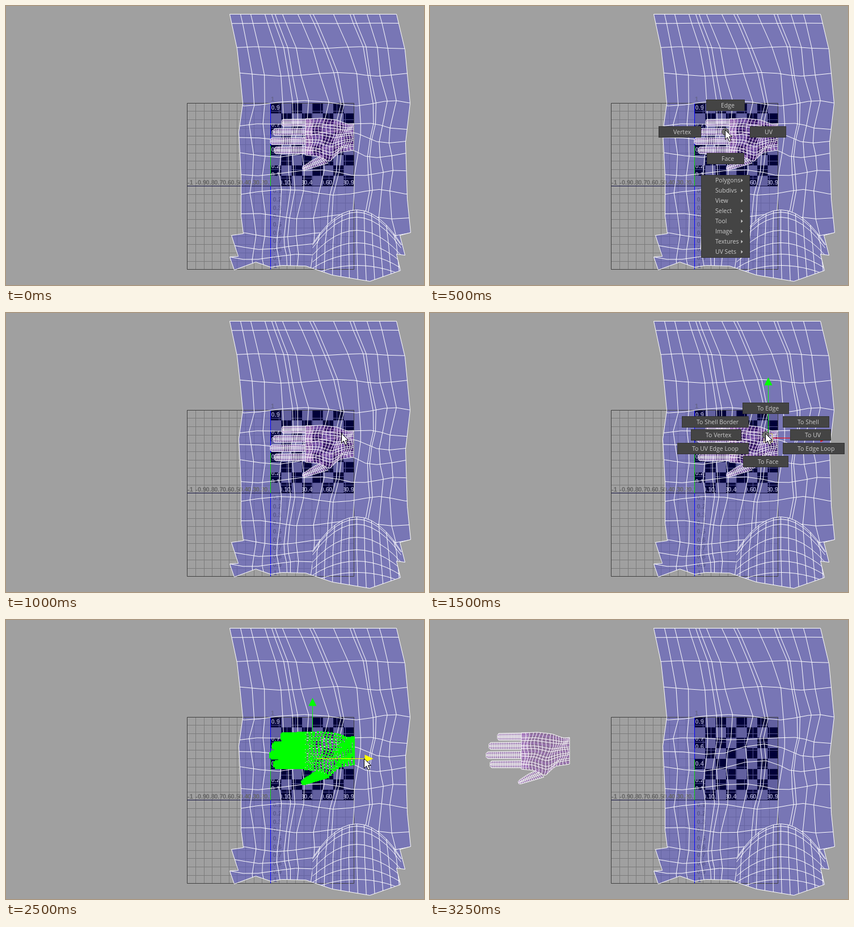
An HTML page with a canvas that plays this animation: 737x492 px, repeating every 3500 ms.

```html
<!DOCTYPE html>
<html>
<head>
<meta charset="utf-8">
<style>
html, body { margin: 0; width: 100%; height: 100%; overflow: hidden; background: #a0a0a0; }
canvas { display: block; }
</style>
</head>
<body>
<canvas id="stage" width="737" height="492"></canvas>
<script>
const c = document.getElementById('stage').getContext('2d');
const STEP = 250, LOOP = 3500;
const CX = 466.5, CY = 317.5, CELL = 14.68;

// Sheet: side edges from top to bottom, then the ragged hem from right to left
const left = [[394,14], [407,75], [412,120], [417,171], [410,222], [414,300], [414,370], [418,401]];
const right = [[688,14], [703,77], [712,171], [704,240], [707,340], [713,399]];
const hem = [[694,404], [703,439], [688,437], [695,466], [641,485], [575,474], [528,458], [486,457],
  [466,460], [440,451], [402,465], [394,442], [409,441], [397,404]];
const outline = [...right, ...hem, ...[...left].reverse()].flat();
const rowYs = [30, 73, 120, 171, 212, 236, 262, 294, 328, 370, 403, 424, 442];
const columnXs = [413, 431, 456, 468, 474, 487, 514, 535, 541, 577, 606, 612, 636, 658];

function edgeX(edge, y) {
  const k = edge.findIndex(p => p[1] > y);
  if (k < 1) return edge[k ? edge.length - 1 : 0][0];
  const [x0, y0] = edge[k - 1], [x1, y1] = edge[k];
  return x0 + (x1 - x0) * (y - y0) / (y1 - y0);
}

// Sheet coordinates (u across, y down) to the warped stage position
function warp(u, y) {
  const l = edgeX(left, y), r = edgeX(right, y);
  const loose = Math.min(1, Math.max(0, (y - 20) / 160));
  const lean = 32 * Math.sin(Math.PI * u) ** 2 * Math.sin(Math.PI * Math.min(y - 14, 400) / 400);
  const arch = 18 * Math.exp(-(((u - .45) / .15) ** 2) - ((y - 240) / 30) ** 2);
  return [
    l + (r - l) * u + lean + 4 * loose * Math.sin(y * .05 + u * 14),
    y - arch + 5 * loose * Math.sin(u * 11 + y * .045)
  ];
}

function along(p, t) {
  const last = p.length / 2 - 1, k = Math.min(last - 1, Math.floor(t * last)), f = t * last - k;
  return [p[2*k] + (p[2*k+2] - p[2*k]) * f, p[2*k+1] + (p[2*k+3] - p[2*k+1]) * f];
}

function patch(top, bottom, cols, n, fill) {
  const grid = Array.from({ length: cols + 1 }, (_, i) => Array.from({ length: n + 1 }, (_, j) => {
    const v = i || n > 9 ? j / n : .2 + .6 * j / n;
    const a = along(top, i / cols), b = along(bottom, i / cols);
    const sway = n > 9 && i && i < cols ? 1.8 * Math.sin(j * .8 + i * .5) : 0;
    return [a[0] + (b[0] - a[0]) * v + sway, a[1] + (b[1] - a[1]) * v];
  }));
  return { grid, fill };
}
const WEAK = 'rgba(150,100,180,.4)', DEEP = 'rgba(115,40,150,.4)';
const hand = [
  ...[486, 471, 466, 473].map((x, i) => {
    const y = 200 + 16.2 * i;
    return patch([x, y, 540, y - 1], [x, y + 12, 540, y + 12], 22, 5, WEAK);
  }),
  patch([522,284, 540,272, 556,264], [524,290, 545,284, 568,277], 13, 5, WEAK),
  patch([528,199, 556,198, 585,201, 602,208, 613,207], [528,263, 548,265, 570,275, 590,258, 613,254], 17, 14, DEEP)
];

function path(p) {
  c.beginPath();
  for (let i = 0; i < p.length; i += 2) c.lineTo(p[i] + .5, p[i+1] + .5);
}
function line(p, color) { path(p); c.strokeStyle = color; c.stroke(); }
function shape(p, color) { path(p); c.closePath(); c.fillStyle = color; c.fill(); }
function rect(x, y, w, h, color) { c.fillStyle = color; c.fillRect(x, y, w, h); }
function text(s, x, y, color) { c.fillStyle = color; c.fillText(s, x, y); }

function gridLines(x0, x1, y0, y1, color) {
  for (let k = -10; k <= 10; k++) {
    const x = Math.round(CX + k * CELL - .5), y = Math.ceil(CY + k * CELL - .5);
    if (x >= x0 && x <= x1) line([x, y0, x, y1], color);
    if (y >= y0 && y <= y1) line([x0, y, x1, y], color);
  }
}

function labels(color, outside) {
  c.font = 'bold 11px "Liberation Sans", Arial, sans-serif';
  for (let k = 1; k < 10; k++) {
    const d = k * CELL;
    text('0.' + k, CX + d, 315, color);
    text('0.' + k, CX + 1, CY - d - 2, color);
    if (outside) {
      text('0.' + k, CX + 3.5 - d, 315, outside);
      text('0.' + k, CX + 4, CY + d - 2, color);
    }
  }
}

function checker() {
  rect(467, 171, 147, 147, '#000038');
  gridLines(467, 613, 171, 317, '#565592');
  labels('#9d9cc4');
  const s = 146.8 / 8;
  for (let i = 0; i < 8; i++)
    for (let j = 0; j < 8; j++)
      if ((i + j) % 2) rect(467 + i * s, 171 + j * s, s, s, '#62609f');
}

function foldY(x, depth) {
  return 359 + depth + (60 - depth * .45) * (x / 78) ** 2;
}
function foldLine(depth) {
  const p = [];
  for (let x = -78; x <= 78; x += 13) p.push(618 + x, foldY(x, depth));
  return p;
}

function mesh() {
  c.save();
  path(outline);
  c.clip();
  c.save();
  // Everything except the raised fold at the lower right
  path(foldLine(0));
  c.lineTo(737, 492);
  c.lineTo(540, 492);
  c.closePath();
  c.rect(0, 0, 737, 492);
  c.clip('evenodd');
  for (const y of rowYs) {
    const p = [];
    for (let u = -.1; u < 1.1; u += .1) p.push(...warp(u, y));
    line(p, '#fff');
  }
  for (const x of columnXs)
    line([14, ...rowYs, 475].flatMap(y => warp((x - 394) / 294, y)), '#fff');
  c.restore();
  for (const depth of [0, 4, 13, 36, 58, 78, 98]) line(foldLine(depth), '#fff');
  for (let j = -5; j <= 5; j++) {
    const x = 618 + j * 13;
    line([x, foldY(j * 13, 0), x + j, 420, x + j * 2 + 2, 490], '#fff');
  }
  c.restore();
  line([...outline, ...right[0]], '#fff');
}

function scene() {
  rect(0, 0, 737, 492, '#a0a0a0');
  gridLines(319, 613, 171, 464, '#7b7b7b');
  shape(outline, '#7876b5');
  c.save();
  path(outline);
  c.clip();
  gridLines(319, 613, 171, 464, '#6665a2');
  c.restore();
  labels('#5a5990', '#666');
  text('-1', 320, 315, '#666');
  text('-', 334, 315, '#666');
  text('1', 467, 168, '#66668e');
  text('-1', 468, 462, '#5a5990');
  checker();
  line([319, 171, 613, 171, 613, 464, 319, 464, 319, 171], '#404040');
  line([319, 317, 613, 317], '#101040');
  line([466, 171, 466, 464], '#00f');
  line([466, 246, 466, 317], '#0d0');
  mesh();
}

function drawHand(dx, selected) {
  c.save();
  c.translate(dx - .5, -.5);
  for (const { grid, fill } of hand) {
    const rows = grid[0].map((_, j) => grid.map(col => col[j]).flat());
    const bottom = grid.map(col => col[col.length - 1]).reverse();
    shape([...rows[0], ...bottom.flat()], fill);
    rows.forEach((p, j) => line(p, j % 3 == 1 ? '#a878c8' : '#fff'));
    for (const col of grid) line(col.flat(), '#fff');
    if (selected)
      for (const [x, y] of grid.flat()) rect(Math.round(x) - 1.5, Math.round(y) - 1.5, 4, 4, '#0f0');
  }
  c.restore();
}

function manipulator(x, y, active, dragging) {
  const color = active ? '#ff0' : '#f00';
  if (!dragging) line([x, y - 8, x, y - 93], '#0f0');
  shape([x, y - 107, x - 7, y - 93, x + 7, y - 93], '#0f0');
  line([x + 8, y, x + 92, y], color);
  shape([x + 107, y, x + 92, y - 7, x + 92, y + 7], color);
  c.setLineDash([2, 2]);
  c.strokeStyle = active ? '#999' : '#dd0';
  c.strokeRect(x - 7.5, y - 7.5, 15, 15);
  c.setLineDash([]);
}

function box(x, y, w, h, hot) {
  rect(x, y, w, h, '#333');
  rect(x + 1, y + 1, w - 2, h - 2, hot ? '#5285a6' : '#444');
}

// Items: name, side (-1 left, 0 middle, 1 right), row
function radialMenu(items, x, y, hot, to) {
  if (to) {
    c.lineWidth = 2;
    line([x, y, ...to], '#333');
    c.lineWidth = 1;
  }
  c.font = '10.5px "Open Sans", "Noto Sans", sans-serif';
  for (const [name, side, row] of items) {
    const w = Math.max(64, Math.round(c.measureText(name).width + 44));
    const gap = row ? 30 : 43;
    const bx = side < 0 ? x - gap - w : side ? x + gap : x - (w >> 1);
    const by = Math.round(y - 10 + row * 23.5);
    box(bx, by, w, 20, name == hot);
    text(name, bx + 26, by + 14, '#ccc');
  }
  c.beginPath();
  c.arc(x, y, 6, 0, 7);
  c.fillStyle = '#777';
  c.fill();
  c.strokeStyle = '#333';
  c.stroke();
}

function list() {
  box(478, 298, 86, 146);
  ['Polygons', 'Subdivs', 'View', 'Select', 'Tool', 'Image', 'Textures', 'UV Sets'].forEach((name, i) => {
    const y = 307 + i * 18;
    text(name, 503, y + 4, '#ccc');
    shape([548, y - 3, 551, y, 548, y + 3], '#ccc');
  });
}

const modes = [['Edge', 0, -2], ['Vertex', -1, 0], ['UV', 1, 0], ['Face', 0, 2]];
const conversions = [['To Edge', 0, -2], ['To Shell Border', -1, -1], ['To Shell', 1, -1], ['To Vertex', -1, 0],
  ['To UV', 1, 0], ['To UV Edge Loop', -1, 1], ['To Edge Loop', 1, 1], ['To Face', 0, 2]];

function cursor([x, y]) {
  const p = [0,0, 0,17, 4,13, 7,20, 10,19, 7,12, 12,12, 0,0].map((v, i) => v + (i % 2 ? y : x));
  shape(p, '#fff');
  line(p, '#000');
}

const OVER = [520, 218], WRIST = [591, 212], SHELL = [643, 188], GRIP = [631, 244];
const pointer = [null, OVER, OVER, WRIST, WRIST, WRIST, WRIST, SHELL, SHELL, GRIP, GRIP, [510, 257], [247, 257], null];

function draw(now) {
  const n = Math.floor(now % LOOP / STEP);
  const dx = n < 11 ? 0 : n < 12 ? -105 : -367;
  const selected = n >= 8 && n <= 12;
  scene();
  drawHand(dx, selected);
  if (selected) manipulator(540 + dx, 244, n >= 10, n >= 11);
  if (n >= 5 && n <= 7) manipulator(596, 220);
  if (n == 2 || n == 3) {
    radialMenu(modes, 521, 222, n == 3 && 'UV', n == 3 && WRIST);
    list();
  }
  if (n == 6 || n == 7) radialMenu(conversions, 592, 215, n == 7 && 'To Shell', n == 7 && SHELL);
  if (pointer[n]) cursor(pointer[n]);
  requestAnimationFrame(draw);
}
requestAnimationFrame(draw);
</script>
</body>
</html>
```
